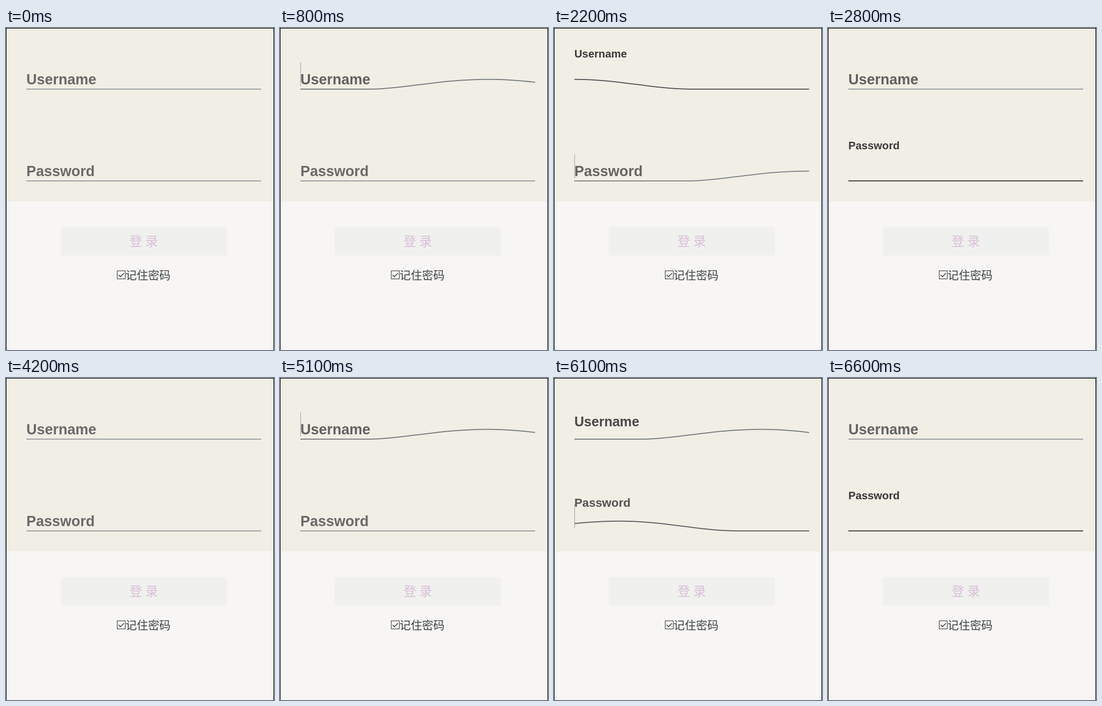
An HTML page with a canvas for the animation above (6900 ms loop, 500 by 600 pixels).

```html
<!DOCTYPE html>
<html lang="zh-CN">
<head>
<meta charset="utf-8">
<title>登录</title>
<style>
  html, body { margin: 0; width: 100%; height: 100%; overflow: hidden; }
  canvas { display: block; }
</style>
</head>
<body>
<canvas id="stage" width="500" height="600"></canvas>
<script>
const ctx = document.getElementById('stage').getContext('2d');
const LOOP = 6900, STEP = 100, BLINK = 496;
const LEFT = 38, WIDTH = 438;
const CJK = '"Noto Sans CJK SC", "Noto Sans CJK", sans-serif';

// The underline is three field widths long and slides left on focus.
const wave = new Path2D('M0,56.5c0,0,298.666,0,399.333,0C448.336,56.5,513.994,46,597,46' +
  'c77.327,0,135,10.5,200.999,10.5c95.996,0,402.001,0,402.001,0');

// The form is reset to its resting state at the start of each session.
const sessions = [
  { start: 0, name: [707, 2144], password: [2144, 4045] },
  { start: 4200, name: [5006, 5845], password: [5845, Infinity] }
];

function bezier(x1, y1, x2, y2) {
  const at = (a, b, s) => 3 * (1 - s) * (1 - s) * s * a + 3 * (1 - s) * s * s * b + s * s * s;
  return x => {
    if (x <= 0) return 0;
    if (x >= 1) return 1;
    let lo = 0, hi = 1;
    for (let i = 0; i < 30; i++) {
      const mid = (lo + hi) / 2;
      if (at(x1, x2, mid) < x) lo = mid; else hi = mid;
    }
    return at(y1, y2, lo);
  };
}
const easeOut = bezier(0, 0, 0.58, 1);
const easeWave = bezier(0, 0.25, 0.5, 1);

function mix(from, to, k) {
  return 'rgb(' + from.map((c, i) => Math.round(c + (to[i] - c) * k)).join(',') + ')';
}

function rect(color, x, y, w, h) {
  ctx.fillStyle = color;
  ctx.fillRect(x, y, w, h);
}

function text(str, font, color, x, y, align = 'left') {
  ctx.font = font;
  ctx.fillStyle = color;
  ctx.textAlign = align;
  ctx.fillText(str, x, y);
}

function drawField(label, top, [focus, blur], t) {
  const focused = t >= focus && t < blur;
  const progress = (ease, duration, delay = 0) => {
    const run = since => ease((t - since - delay) / duration);
    return t < blur ? run(focus) : 1 - run(blur);
  };
  const dark = [51, 51, 51];

  const lift = progress(easeOut, 200, 150);
  const ink = mix([105, 105, 105], dark, progress(easeOut, 1000));
  const size = 27 * (1 - 0.25 * lift);
  text(label, `bold ${size}px "Liberation Sans", Arial, sans-serif`, ink, LEFT, top + 90 - 50.5 * lift);

  const slide = progress(easeWave, 700);
  ctx.save();
  ctx.beginPath();
  ctx.rect(LEFT, top, WIDTH, 105);
  ctx.clip();
  ctx.translate(LEFT - 0.666 * 3 * WIDTH * slide, top);
  ctx.scale(3 * WIDTH / 1200, 1.75);
  ctx.lineWidth = 1;
  ctx.strokeStyle = mix([146, 152, 158], dark, slide);
  ctx.stroke(wave);
  ctx.restore();

  if (focused && Math.floor((t - focus) / BLINK) % 2 === 0) {
    rect('#98a4a8', LEFT, top + 49, 1, 45);
  }
}

function drawForm() {
  rect('#f7f6f5', 0, 0, 500, 600);
  rect('#f0eee5', 0, 0, 500, 323);
  rect('#000', 0, 0, 500, 1);
  rect('#000', 0, 0, 1, 600);
  rect('#000', 499, 0, 1, 600);

  ctx.fillStyle = '#f0f1ee';
  ctx.beginPath();
  ctx.roundRect(102, 371, 310, 53, 4);
  ctx.fill();
  text('登 录', '24px ' + CJK, '#d8bfd8', 257, 406, 'center');

  ctx.strokeStyle = '#333';
  ctx.lineWidth = 1;
  ctx.strokeRect(207.5, 452.5, 15, 15);
  ctx.lineWidth = 1.4;
  ctx.beginPath();
  ctx.moveTo(210, 460);
  ctx.lineTo(213.5, 463.5);
  ctx.lineTo(220, 457);
  ctx.stroke();
  text('记住密码', '21px ' + CJK, '#3d4244', 223, 468);
}

function draw(t) {
  const session = sessions[t < sessions[1].start ? 0 : 1];
  drawForm();
  drawField('Username', 15, session.name, t);
  drawField('Password', 186, session.password, t);
}

let begin;
function tick(now) {
  if (begin === undefined) begin = now;
  const t = (now - begin) % LOOP;
  draw(Math.floor(t / STEP) * STEP);
  requestAnimationFrame(tick);
}
draw(0);
requestAnimationFrame(tick);
</script>
</body>
</html>
```
